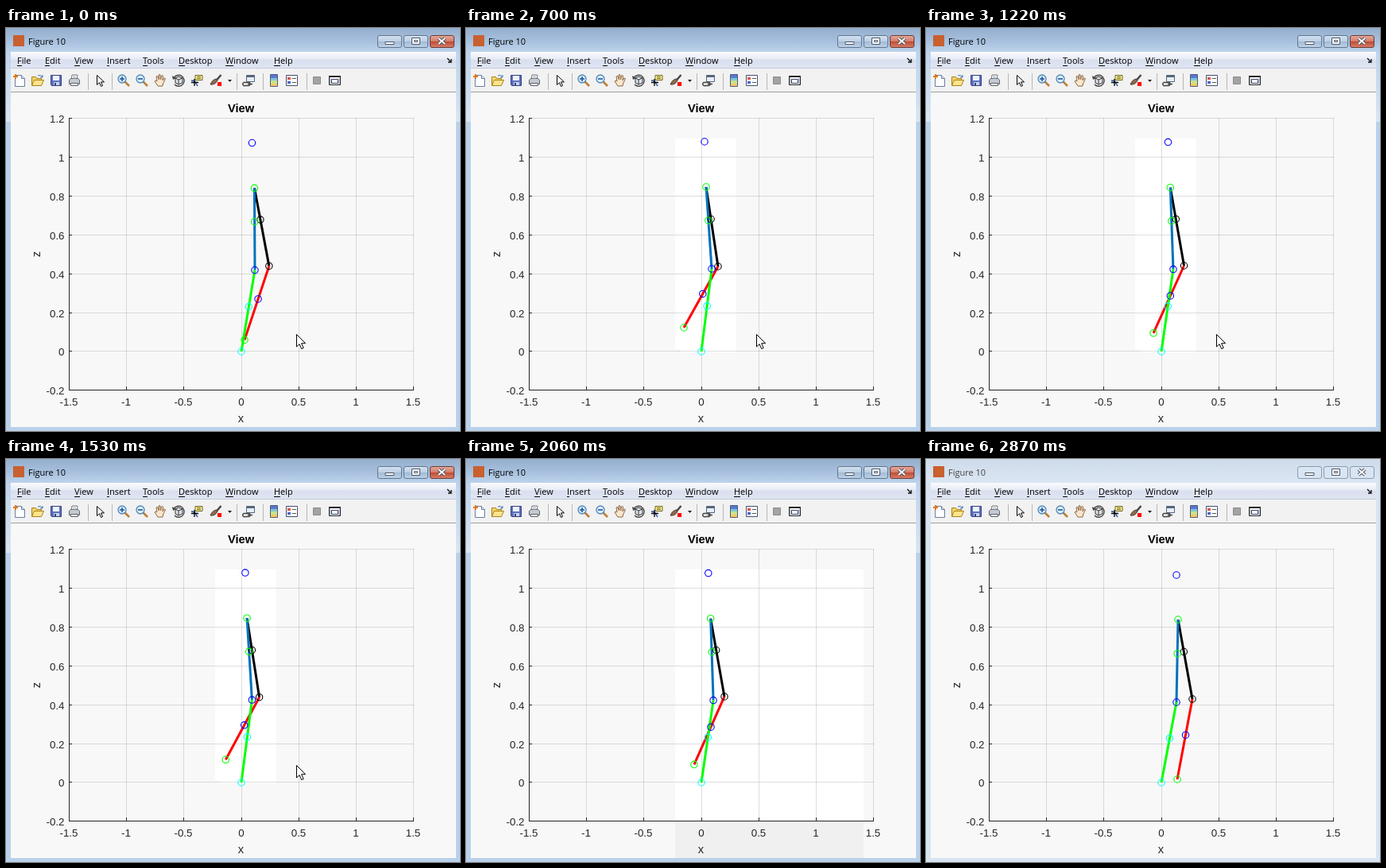
Animation of 571x507 px, one loop 2960 ms. Source, as an HTML page:

```html
<!DOCTYPE html>
<html lang="en">
<head>
<meta charset="utf-8">
<title>Figure 10</title>
<style>
html, body { margin: 0; width: 100%; height: 100%; overflow: hidden; background: #b9d1ea; }
svg { display: block; width: 571px; height: 507px; }
.ui { font: 11px "Open Sans", "Noto Sans", sans-serif; fill: #000; }
.tick { font: 13.33px "Liberation Sans", Arial, sans-serif; fill: #262626; text-anchor: middle; }
.side { text-anchor: end; }
.label { font: 14.67px "Liberation Sans", Arial, sans-serif; fill: #262626; text-anchor: middle; }
.title { font-weight: bold; fill: #000; }
.idle .on, svg:not(.idle) .off { display: none; }
.idle .caption { fill: #444; }
.line { fill: none; stroke-width: 3; }
.dot { fill: none; stroke-width: 1.1; }
</style>
</head>
<body>
<svg id="stage" viewBox="0 0 571 507">
  <defs>
    <linearGradient id="bar" x2="0" y2="1">
      <stop stop-color="#94aecd"/><stop offset=".5" stop-color="#a5bedb"/><stop offset="1" stop-color="#bdd3ec"/>
    </linearGradient>
    <linearGradient id="idleBar" x2="0" y2="1">
      <stop stop-color="#cedbea"/><stop offset="1" stop-color="#dbe6f3"/>
    </linearGradient>
    <linearGradient id="edge" x2="0" y2="1">
      <stop stop-color="#bdd3ec"/><stop offset="1" stop-color="#d8e5f3"/>
    </linearGradient>
    <linearGradient id="menu" x2="0" y2="1">
      <stop stop-color="#fafbfe"/><stop offset=".45" stop-color="#e7ebf5"/><stop offset=".5" stop-color="#d9dfee"/><stop offset="1" stop-color="#dfe5f3"/>
    </linearGradient>
    <linearGradient id="glass" x2="0" y2="1">
      <stop stop-color="#d5e2f1"/><stop offset=".48" stop-color="#bccfe4"/><stop offset=".5" stop-color="#a2bad4"/><stop offset="1" stop-color="#bcd2e9"/>
    </linearGradient>
    <linearGradient id="red" x2="0" y2="1">
      <stop stop-color="#e5ab9c"/><stop offset=".48" stop-color="#d47c69"/><stop offset=".5" stop-color="#bd4a34"/><stop offset="1" stop-color="#d6806a"/>
    </linearGradient>
  </defs>

  <g class="on">
    <path fill="#b9d1ea" d="M0 0h571v507H0z"/>
    <path fill="url(#edge)" d="M0 30h571v88H0z"/>
    <path fill="url(#bar)" d="M0 0h571v30H0z"/>
  </g>
  <g class="off">
    <path fill="#d7e4f2" d="M0 0h571v507H0z"/>
    <path fill="url(#idleBar)" d="M0 0h571v30H0z"/>
  </g>
  <rect x="9" y="9" width="14" height="14" fill="#c8602f"/>
  <text class="ui caption" x="28" y="21">Figure 10</text>
  <g id="buttons"></g>

  <path fill="#f2f2f2" d="M6 30h560v50H6z"/>
  <path fill="url(#menu)" d="M6 30h560v20H6z"/>
  <path stroke="#c3c9d8" d="M6 50.5h560"/>
  <path fill="#f8f8f8" d="M6 81h560v421H6z"/>
  <path stroke="#a0a0a0" d="M6 80.5h560"/>
  <g id="menus" class="ui"></g>
  <path d="M555 38l4 4M560 39v4h-4" fill="none" stroke="#111" stroke-width="1.3"/>
  <g id="tools" fill="none"></g>

  <g id="patches"></g>
  <g id="axes"></g>
  <g id="robot" transform="translate(-.5 -.5)"></g>
  <path id="cursor" fill="#fff" stroke="#000" d="M.5 .5v15.5l3.6-3.4 2.6 6 2.5-1.1-2.6-5.8h5z"/>
</svg>
<script>
const $ = id => document.getElementById(id);
const add = (parent, tag, attrs, text) => {
  const el = document.createElementNS('http://www.w3.org/2000/svg', tag);
  for (const k in attrs) el.setAttribute(k, attrs[k]);
  if (text) el.textContent = text;
  parent.append(el);
  return el;
};

// Window buttons
const glyphs = ['M477 17.5h11v3h-11z', 'M510.5 12.5h10v8h-10zM513.5 15.5h4v2h-4z', 'M544 13l8 7M552 13l-8 7'];
glyphs.forEach((d, i) => {
  const close = i == 2;
  const box = { x: 467.5 + 33 * i, y: 9.5, width: 30, height: 15, rx: 2.5 };
  add($('buttons'), 'rect', { ...box, class: 'on', fill: close ? 'url(#red)' : 'url(#glass)', stroke: close ? '#6d3c38' : '#62768f' });
  add($('buttons'), 'rect', { ...box, class: 'off', fill: '#d9e5f2', stroke: '#8b9bb0' });
  if (close) add($('buttons'), 'path', { d, stroke: '#4b4f5c', 'stroke-width': 4 });
  add($('buttons'), 'path', { d, fill: '#fff', stroke: close ? '#fff' : '#4b5668', 'stroke-width': close ? 2 : 1 });
});

// Menu with underlined access keys
const menu = { File: 14, Edit: 49, View: 86, Insert: 127, Tools: 172, Desktop: 217, Window: 276, Help: 337 };
for (const name in menu) {
  const el = add($('menus'), 'text', { x: menu[name], y: 45 }, name);
  add($('menus'), 'path', { d: `M${menu[name]} 47.5h${Math.round(el.getSubStringLength(0, 1))}`, stroke: '#000' });
}

// Toolbar
const draw = (x, ...parts) => {
  const g = add($('tools'), 'g', { transform: `translate(${x} 58)` });
  for (const [d, stroke, fill = 'none', width = 1] of parts) add(g, 'path', { d, stroke, fill, 'stroke-width': width });
};
const lens = d => [
  ['M9 9l6 6', '#c08038', 'none', 2.6],
  ['M1 6a5 5 0 0 1 10 0a5 5 0 0 1-10 0z', '#4f86b8', '#d8f0fb', 1.3],
  [d, '#1c4d94', 'none', 1.5]];
draw(9, ['M2.5 1.5h8l4 4v10h-12z', '#6b7f9c', '#fdfdff'], ['M10.5 1.5v4h4', '#6b7f9c', '#d6e2f2'], ['M0 3h6M3 0v6', '#e07a20', 'none', 2]);
draw(32, ['M.5 14.5v-11h5l1 2h6v3', '#a8811c', '#f3d56b'], ['M.5 14.5l3-7h12l-3 7z', '#a8811c', '#ffe48c'], ['M8 2q4-2 6 2m0-3v3h-3', '#3d70b2']);
draw(55, ['M1.5 1.5h13v13h-12l-1-1z', '#33407f', '#5c6fc0'], ['M4 2h8v6h-8z', 'none', '#eef2fc'], ['M5 10h7v4h-7z', 'none', '#cad2e4'], ['M6 11h2v3h-2z', 'none', '#33407f']);
draw(78, ['M4 7l1-6h7l-1 6', '#777', '#fff'], ['M1.5 7.5l2-2h9l2 2v5h-13z', '#5d626b', '#c5c9d0'], ['M3.5 11.5h9v3h-9z', '#5d626b', '#fafafa'], ['M6 3h4M6 5h4', '#9ab']);
draw(113, ['M1.5 1.5v12l3-2.8 2 4.8 2-1-2-4.6h4z', '#000', '#fff']);
draw(140, ...lens('M3 6h6M6 3v6'));
draw(163, ...lens('M3 6h6'));
draw(186, ['M5 15l-4-6q1-2 3 0l-1-6q1-1 2 0l1.5 4-.5-6q1.5-1 2 0l.5 6 1-5q1.5-1 2 0l-.5 6 2-3q2 0 1 2l-2.5 5-.5 3z', '#8a6642', '#fbe6cd']);
draw(209, ['M4 5l4-2 5 2v6l-5 2-4-2zM4 5l4 2 5-2M8 7v6', '#333', '#dde3ea'], ['M3 13a7 7 0 1 0-1-8', '#444', 'none', 1.4], ['M0 2l1 5 4-2z', 'none', '#444']);
draw(232, ['M6 1.5h9v6h-9z', '#6d6320', '#fbf29a'], ['M8 3.5h5M8 5.5h5', '#6d6320'], ['M1 8q4 0 5 2t3 5', '#2455b0', 'none', 1.4], ['M5 6v9M1 10.5h9', '#000', 'none', 1.3]);
draw(256, ['M14.5 1l-6 7', '#444', 'none', 2.4], ['M9 6q-5 0-8 7 6 1 9-5z', '#4b4036', '#8b6a4b'], ['M10 10h5v5h-5z', 'none', '#f00']);
draw(278, ['M1 7h5l-2.5 3z', 'none', '#222']);
draw(298, ['M4.5 1.5h10v8h-10z', '#55657c', '#e6eef8'], ['M4.5 3h10', '#55657c', 'none', 2], ['M1 10.5h6a2 2 0 0 1 0 4h-4a2 2 0 0 1-2-4M6 12.5h6', '#444', 'none', 1.5]);
draw(329, ['M3.5 .5h9v15h-9z', '#505a78', '#7fc6d8'], ['M4 1h8v4h-8z', 'none', '#5878d0'], ['M4 8h8v4h-8z', 'none', '#c9e38a'], ['M4 12h8v3h-8z', 'none', '#f4c964']);
draw(351, ['M1.5 1.5h14v13h-14z', '#44506e', '#fff'], ['M3 4h4v3h-4z', 'none', '#e05248'], ['M3 9h4v3h-4z', 'none', '#4866c8'], ['M9 5.5h5M9 10.5h5', '#555']);
draw(383, ['M3.5 3.5h9v9h-9z', '#8b8b8b', '#a3a3a3']);
draw(405, ['M1.5 2.5h14v11h-14z', '#222', '#fff'], ['M1.5 3h14', '#222', 'none', 2], ['M4.5 6.5h8v5h-8z', '#3c4a68', '#eef3fa'], ['M3 5v8M14 5v8', '#889']);
for (const x of [103, 133, 290, 323, 378])
  add($('tools'), 'path', { d: `M${x}.5 57v21`, stroke: '#b8b8b8' });

// Repainted areas, inside and below the axes
const axesPatch = add($('patches'), 'path', { fill: '#fff' });
const marginPatch = add($('patches'), 'path', { fill: '#f0f0f0' });

// Axes
const X = v => Math.floor(296.1 + v * 144.5) + .5;
const Y = v => Math.floor(406.95 - v * 244.6) + .5;
const ticks = (from, count, step) => Array.from({ length: count }, (_, i) => +(from + i * step).toFixed(1));
const xs = ticks(-1.5, 7, .5), ys = ticks(-.2, 8, .2);
const axes = $('axes');
add(axes, 'path', { stroke: '#000', 'stroke-opacity': .13, d: xs.map(v => `M${X(v)} 113v343`).join('') + ys.map(v => `M79 ${Y(v)}h434`).join('') });
add(axes, 'path', {
  stroke: '#262626', fill: 'none',
  d: `M79.5 113V${Y(-.2)}H513` + xs.map(v => `M${X(v)} 456v-5`).join('') + ys.map(v => `M79 ${Y(v)}h4`).join('')
});
for (const v of xs) add(axes, 'text', { class: 'tick', x: X(v) - .5, y: 475 }, String(v));
for (const v of ys) add(axes, 'text', { class: 'tick side', x: 73.5, y: Y(v) + 5 }, String(v));
add(axes, 'text', { class: 'label title', x: 295.5, y: 106 }, 'View');
add(axes, 'text', { class: 'label', x: 295.5, y: 496 }, 'x');
add(axes, 'text', { class: 'label', transform: 'translate(43 284.5) rotate(-90)' }, 'z');

// Linear path through keys of the form [at, ...values]
const along = (keys, n) => {
  const i = Math.max(1, keys.findIndex(k => k[0] >= n));
  const a = keys[i - 1], b = keys[i], u = (n - a[0]) / (b[0] - a[0]);
  return a.slice(1).map((v, k) => v + (b[k + 1] - v) * u);
};

const LOOP = 2960, IDLE = 2870, FIRST = 60, PACE = 76.5, CAPTURES = 30;
const captureAt = t => t < FIRST ? 0 : Math.min(CAPTURES, 1 + Math.floor((t - FIRST) / PACE));

// Strides completed, and the pointer leaving the window
const strides = [[0, .677], [5, 1.535], [9, 2.15], [16, 3.394], [24, 5], [25, 5.02], [30, 6]];
const pointer = [[0, 365, 385], [21, 365, 385], [24, 371, 425], [25, 488, 490], [26, 600, 560], [30, 600, 560]];

// Early, middle and last pose of a stride, joined by a parabola
const nodes = [.15, .535, 1];
const poses = {
  head: [[300.5, 143.5], [307.5, 144.5], [315.5, 146.5]],
  hip: [[302.5, 200.5], [310.5, 201.5], [317.5, 202.5]],
  knee: [[317.5, 300.5], [328.5, 299.5], [335.5, 302.5]],
  foot: [[274.5, 377.5], [293.5, 388.5], [316.5, 403.5]],
  stance: [[309.5, 303.5], [312.5, 304.5], [315.5, 306.5]]
};
const weights = u => nodes.map((p, i) =>
  nodes.reduce((w, q, j) => i == j ? w : w * (u - q) / (p - q), 1));
const poseAt = n => {
  const [p] = along(strides, n);
  const w = weights(p - Math.ceil(p - 1e-6) + 1);
  const pose = { base: [296.5, 407.5] };
  for (const joint in poses)
    pose[joint] = [0, 1].map(k => poses[joint].reduce((sum, at, i) => sum + at[k] * w[i], 0));
  return pose;
};

const robot = $('robot');
const lines = ['#000', '#f00', '#0072bd', '#0f0'].map(stroke => add(robot, 'path', { class: 'line', stroke }));
const dots = ['#00f', '#000', '#000', '#00f', '#0f0', '#0f0', '#0f0', '#00f', '#0ff', '#0ff']
  .map(stroke => add(robot, 'circle', { class: 'dot', stroke, r: 4.2 }));
const between = (a, b, u) => a.map((v, k) => v + (b[k] - v) * u);

function showRobot({ head, hip, knee, foot, stance, base }) {
  [[hip, knee], [knee, foot], [hip, stance], [stance, base]]
    .forEach(([a, b], i) => lines[i].setAttribute('d', `M${a}L${b}`));
  [head, between(hip, knee, .405), knee, between(knee, foot, .447), foot, hip,
    between(hip, stance, .41), stance, between(stance, base, .45), base]
    .forEach(([x, y], i) => {
      dots[i].setAttribute('cx', x);
      dots[i].setAttribute('cy', y);
    });
}

const changed = n => {
  const both = [poseAt(n - 1), poseAt(n)];
  const marks = both.flatMap(p => [p.head, p.knee, p.foot]);
  const box = {
    l: Math.min(...marks.map(m => m[0])) - 5,
    r: Math.max(...marks.map(m => m[0])) + 4.5,
    b: Math.max(404, ...marks.map(m => m[1] + 4.5))
  };
  const [from, to] = [along(pointer, n - 1), along(pointer, n)];
  if (from[0] != to[0])
    for (const [x, y] of [from, to].filter(c => c[0] < 571)) {
      box.r = Math.max(box.r, x + 12);
      box.b = Math.max(box.b, Math.min(y + 19, 502));
    }
  return { l: Math.round(box.l), r: Math.round(box.r), b: Math.round(box.b) };
};
const boxes = Array.from({ length: CAPTURES }, (_, i) => changed(i + 1));
const rect = (l, r, top, bottom) => bottom > top ? `M${l} ${top}H${r}V${bottom}H${l}z` : '';

function render(t) {
  const n = captureAt(t), idle = t >= IDLE;
  const shown = idle ? [] : boxes.slice(0, n);
  showRobot(poseAt(n));
  axesPatch.setAttribute('d', shown.map(({ l, r, b }) => rect(l, r, 139, Math.min(b, 456))).join(''));
  marginPatch.setAttribute('d', shown.map(({ l, r, b }) => rect(l, r, 456, b)).join(''));
  $('cursor').setAttribute('transform', `translate(${along(pointer, n)})`);
  $('stage').classList.toggle('idle', idle);
}

const start = performance.now();
function tick() {
  render((performance.now() - start) % LOOP);
  requestAnimationFrame(tick);
}
tick();
</script>
</body>
</html>
```
